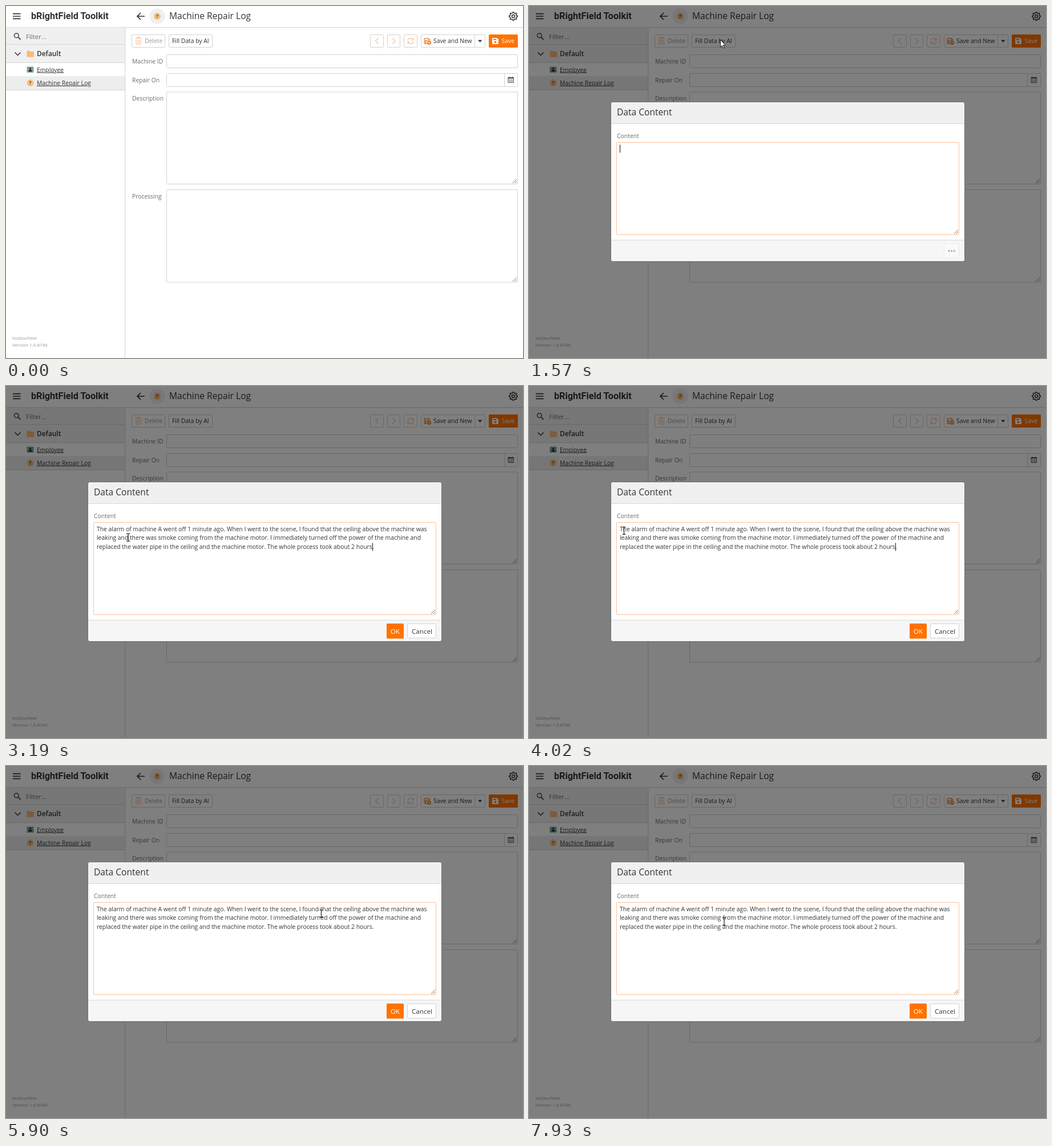
Animation of 906 by 618 pixels, one loop 8 s. Source, as an HTML page:

```html
<!DOCTYPE html>
<html lang="en">
<head>
<meta charset="utf-8">
<title>Repair log form</title>
<style>
html, body { margin: 0; width: 100%; height: 100%; overflow: hidden; background: #fff; }
svg { display: block; width: 906px; height: 618px; font-family: "Open Sans", "Noto Sans", sans-serif; }
text { white-space: pre; }
.brand { font-family: Roboto, "Liberation Sans", sans-serif; font-weight: 700; }
</style>
</head>
<body>
<svg id="stage" viewBox="0 0 906 618" xmlns="http://www.w3.org/2000/svg"></svg>
<script>
const LOOP = 8000;
const OPEN = 1570, READY = 1640, PASTE = 2860, BLINK = 530;
const ORANGE = '#ff7200', PALE = '#ffc79f', INK = '#333', GRAY = '#6b6b6b', EDGE = '#d2d2d2';

const text = (x, y, s, size = 10.33, fill = INK, extra = '') =>
  `<text x="${x}" y="${y}" font-size="${size}" fill="${fill}" ${extra}>${s}</text>`;
const rect = (x, y, w, h, fill = '#fff', stroke = 'none', r = 0) =>
  `<rect x="${x}" y="${y}" width="${w}" height="${h}" rx="${r}" fill="${fill}" stroke="${stroke}"/>`;
const line = (d, stroke = INK, w = 1, extra = '') =>
  `<path d="${d}" fill="none" stroke="${stroke}" stroke-width="${w}" ${extra}/>`;
const fill = (d, color) => `<path d="${d}" fill="${color}" fill-rule="evenodd"/>`;
const box = (x, y, w, h, stroke = EDGE) => rect(x + .5, y + .5, w, h, '#fff', stroke, 1);
const grip = (x, y) => line(`M${x - 7} ${y}l7-7M${x - 3} ${y}l3-3`, '#666', .9);
const area = (x, y, w, h, stroke) => box(x, y, w, h, stroke) + grip(x + w - 1, y + h - 1);

function gear(x, y) {
  let d = '';
  for (let i = 0; i < 32; i++) {
    const r = i % 4 < 2 ? 7.3 : 5.6, a = (i - .5) * Math.PI / 16;
    d += `${i ? 'L' : 'M'}${(x + r * Math.cos(a)).toFixed(2)} ${(y + r * Math.sin(a)).toFixed(2)}`;
  }
  return line(d + 'Z', INK, 1.5, 'stroke-linejoin="round"') +
    `<circle cx="${x}" cy="${y}" r="2.5" fill="none" stroke="${INK}" stroke-width="1.5"/>`;
}

const question = (x, y) => `<circle cx="${x}" cy="${y}" r="6" fill="#fac07f"/>` +
  text(x, y + 3.3, '?', 9, '#6b4a2b', 'text-anchor="middle" font-weight="700"');

const disk = (x, y, color) =>
  fill(`M${x + 1.2} ${y}h7l2.8 2.8v7q0 1.2-1.2 1.2h-8.6q-1.2 0-1.2-1.2v-8.6q0-1.2 1.2-1.2z` +
    `M${x + 1.8} ${y + 1.8}v2h5.4v-2zM${x + 3.7} ${y + 7.4}a1.8 1.8 0 0 0 3.6 0a1.8 1.8 0 0 0-3.6 0z`, color);

function calendar(x, y) {
  const color = '#555';
  let s = line(`M${x + .5} ${y + 1.5}h9.5v9h-9.5zM${x + 2.5} ${y}v2M${x + 8} ${y}v2`, color) +
    rect(x, y + 1.5, 10.5, 2, color);
  for (let i = 0; i < 6; i++) s += rect(x + 2 + i % 3 * 2.5, y + 5.2 + (i / 3 | 0) * 2.5, 1.5, 1.5, color);
  return s;
}

function sidebar() {
  return rect(0, 38, 208, 30, '#f0f0f0') + rect(0, 68, 208, 32, '#f0f0f0') +
    rect(0, 123, 208, 25, '#ededed') +
    line('M0 67.5H208M0 99.5H208M0 147.5H208', '#d4d4d4') +
    line('M208.5 38V618', '#dcdcdc') + line('M209.5 38V618', '#f3f3f3') +
    `<circle cx="18.3" cy="51.8" r="3.9" fill="none" stroke="#444" stroke-width="1.5"/>` +
    line('M21.2 54.7l4.3 4.3', '#444', 1.8) + text(35, 57.5, 'Filter...', 11.4, GRAY) +
    line('M15.5 81.5l5 5 5-5', INK, 1.5) +
    fill('M36.5 80q0-1.5 1.5-1.5h3l1.7 1.6h5q1.3 0 1.3 1.3v7q0 1.3-1.3 1.3h-9.7q-1.5 0-1.5-1.3z', '#fbb878') +
    text(54, 88.3, 'Default', 11.9, INK, 'font-weight="600"') +
    rect(36.5, 106.5, 12, 10.5, '#83a39b', 'none', 1) +
    `<circle cx="42.5" cy="109.8" r="1.6" fill="#222"/>` + fill('M39.4 115q0-3 3.1-3t3.1 3z', '#222') +
    text(54, 115.5, 'Employee', 10.33, INK, 'text-decoration="underline"') + question(42.5, 135) +
    text(54, 138.8, 'Machine Repair Log', 10.33, INK, 'text-decoration="underline"') +
    text(11, 586, 'VolDocFiller', 8, '#999') + text(11, 597.7, 'Version 1.0.8746', 8, '#999');
}

function header() {
  return line('M0 37.5H906', '#dedede') + line('M209 38.5H906', '#f0f0f0') +
    line('M12 13.6h13.5M12 18h13.5M12 22.4h13.5', INK, 1.7) +
    text(44, 23.3, 'bRightField Toolkit', 16.2, INK, 'class="brand"') +
    line('M243 18H230M236 12l-6 6 6 6', INK, 1.7) +
    '<circle cx="265" cy="18" r="13.5" fill="#f0f0f0"/>' + question(265, 18) +
    text(286, 23.4, 'Machine Repair Log', 15.6, INK, 'font-weight="500"') + gear(889, 18);
}

function toolbar() {
  const button = (x, w) => box(x, 50, w, 22);
  return button(220, 58) +
    line('M226.5 56.6h11M230 56v-1h4v1M228 58.5v8.3h8v-8.3M230.7 59v6M233.3 59v6', PALE, 1.3) +
    text(243, 65.2, 'Delete', 10.33, '#999') +
    button(285, 76) + text(291, 65.2, 'Fill Data by AI') +
    button(638, 23) + line('M652.5 56.5l-5 5 5 5', PALE, 1.5) +
    button(668, 22) + line('M677 56.5l5 5-5 5', PALE, 1.5) +
    button(697, 23) +
    line('M704 60.5q1.2-4 5-4 2.5 0 4 2M714 62.5q-1.2 4-5 4-2.5 0-4-2', PALE, 1.5) +
    fill('M714.6 56v4.5h-4.5zM703.4 67v-4.5h4.5z', PALE) +
    button(727, 112) + line('M821.5 50V73', EDGE) + disk(732.5, 56, '#f5a15c') +
    '<circle cx="741.5" cy="64.5" r="3.8" fill="#d97620" stroke="#fff" stroke-width=".7"/>' +
    line('M739.5 64.5h4M741.5 62.5v4', '#fff', 1) +
    text(749, 65.2, 'Save and New') + fill('M827 59.7h7.4l-3.7 4z', INK) +
    rect(846, 50, 51, 23, ORANGE, 'none', 1.5) + disk(852, 56, '#fff') + text(868.5, 65.2, 'Save', 10.4, '#fff');
}

function form() {
  return text(221, 101, 'Machine ID', 10.33, GRAY) + box(281, 85, 615, 23) +
    text(221, 133.5, 'Repair On', 10.33, GRAY) + box(281, 118, 615, 23) +
    line('M873.5 118V141', EDGE) + calendar(879.5, 124) +
    text(221, 166, 'Description', 10.33, GRAY) + area(281, 150.5, 615, 161.5) +
    text(221, 338, 'Processing', 10.33, GRAY) + area(281, 322, 615, 162.5);
}

const story = [
  'The alarm of machine A went off 1 minute ago. When I went to the scene, I found that the ceiling above the machine was',
  'leaking and there was smoke coming from the machine motor. I immediately turned off the power of the machine and',
  'replaced the water pipe in the ceiling and the machine motor. The whole process took about 2 hours.'
];

function dialog() {
  const dots = [736, 740.7, 745.4].map(x => `<circle cx="${x}" cy="430" r="1.8" fill="#b0b0b0"/>`).join('');
  return '<rect width="906" height="618" fill="#000" opacity=".5"/>' +
    rect(143.5, 168.5, 620, 280, '#fff', '#6f6f6f', 4) +
    fill('M144 206v-33q0-4 4-4h611q4 0 4 4v33z', '#f0f0f0') +
    fill('M144 411h619v33q0 4-4 4h-611q-4 0-4-4z', '#f6f6f6') +
    line('M144 206.5h619M144 411h619', '#dadada') +
    text(154, 192.2, 'Data Content', 15.6, INK, 'font-weight="500"') +
    text(154, 231.5, 'Content', 10.4, GRAY) + area(153, 239, 600, 162, '#fdbf94') +
    `<g id="wait">${rect(727.5, 417.5, 26, 25, '#fafafa', '#ebebeb', 1)}${dots}</g>` +
    `<g id="actions">${rect(667, 417, 30, 26.5, ORANGE, 'none', 1.5)}${text(673.7, 435, 'OK', 11.6, '#fff')}` +
    `${box(703, 417, 50, 25)}${text(711, 435, 'Cancel', 11.6)}</g>` +
    `<g id="story">${story.map((s, i) => text(159, 254.8 + i * 15.6, s)).join('')}</g>` +
    '<rect id="caret" width="1" height="14" fill="#111"/>';
}

const $ = id => document.getElementById(id);
$('stage').innerHTML = rect(0, 0, 906, 618) + sidebar() + header() + toolbar() + form() +
  `<g id="dialog">${dialog()}</g>` +
  '<path id="arrow" d="M0 0V12.6L2.9 9.9 4.9 14.6 6.8 13.8 4.8 9.2H8.8Z" fill="#fff" stroke="#111" stroke-width=".9"/>' +
  '<path id="beam" d="M-3-6.5H-.8L0-5.8.8-6.5H3M0-5.8V5.8M-3 6.5H-.8L0 5.8.8 6.5H3" fill="none" stroke="#111" stroke-width="1.1"/>';

// Pointer path as [time, x, y]; null marks a stretch outside the window.
const path = [
  [0, null], [130, 897, 543], [200, 895, 186], [270, null],
  [670, 288, -8], [850, 318, 22], [1060, 344, 56], [1220, 340, 62], [1350, 335.5, 59.5],
  [1640, 335.5, 59.5], [1780, 352, 130], [1920, 382, 256], [2050, 396, 291], [2120, 397, 294.5],
  [2650, 397, 294.5], [2800, 385, 299], [3020, 290, 286], [3250, 188, 259], [3400, 168, 254],
  [3700, 169, 256], [4020, 166.5, 254], [4290, 166.5, 254], [4500, 178, 252.5], [5060, 314, 257.5],
  [5480, 425, 258], [5900, 552, 259], [6200, 677, 259], [6400, 560, 266], [6740, 224, 277.5],
  [6950, 194, 278], [7250, 205, 278], [7580, 251, 277], [7930, 342, 273], [8000, 342, 273]
];

function pointerAt(t) {
  let i = path.length - 2;
  while (path[i][0] > t) i--;
  const [t0, x, y] = path[i], [t1, x1, y1] = path[i + 1];
  if (x === null) return null;
  if (x1 === null || x > 890) return [x, y];
  const k = (t - t0) / (t1 - t0);
  return [x + (x1 - x) * k, y + (y1 - y) * k];
}

const show = (id, on) => { $(id).style.display = on ? '' : 'none'; };
const move = (id, x, y) => $(id).setAttribute('transform', `translate(${x.toFixed(1)} ${y.toFixed(1)})`);

function draw(t) {
  const open = t >= OPEN, pasted = t >= PASTE;
  show('dialog', open);
  show('wait', t < READY);
  show('actions', t >= READY);
  show('story', pasted);

  const since = t - (pasted ? PASTE : OPEN);
  show('caret', Math.floor(since / (pasted ? BLINK : 540)) % 2 === 0);
  move('caret', pasted ? 642 : 159, pasted ? 275.5 : 243.5);

  const p = pointerAt(t);
  const typing = p && open && p[1] > 240;
  show('arrow', p && !typing);
  show('beam', typing);
  if (p) move(typing ? 'beam' : 'arrow', ...p);
}

const start = performance.now();
function tick() {
  draw((performance.now() - start) % LOOP);
  requestAnimationFrame(tick);
}
tick();
</script>
</body>
</html>
```
